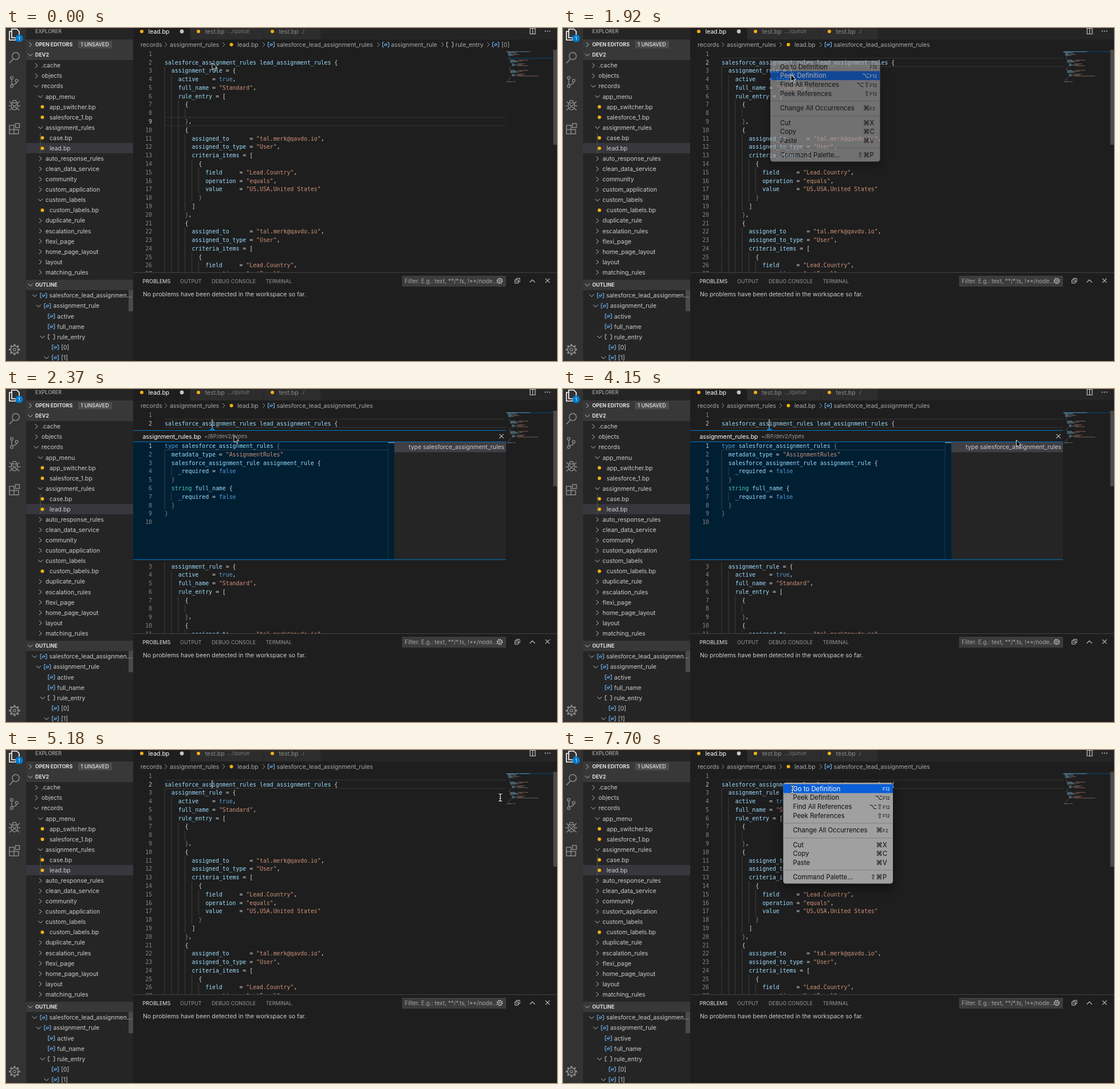
These frames come from a looping animation (962x582 px, 8000 ms). An HTML page:

```html
<!DOCTYPE html>
<html lang="en">
<head>
<meta charset="utf-8">
<title>Peek definition</title>
<style>
html, body { margin: 0; width: 100%; height: 100%; overflow: hidden; background: #1e1e1e; }
svg { display: block; width: 962px; height: 582px; }
text { white-space: pre; font-family: Inter, Roboto, sans-serif; }
.mono { font-family: 'DejaVu Sans Mono', 'Liberation Mono', monospace; }
.menu { filter: drop-shadow(0 7px 9px rgba(0,0,0,.5)); }
</style>
</head>
<body>
<svg id="stage" viewBox="0 0 962 582"></svg>
<script>
const LOOP = 8000, STEP = LOOP / 54;
const CH = 5.936, LINE = 14.79, LEFT = 277, PEEK_SHIFT = 235.2;

const MAIL = '"tal.merk@qavdo.io"';
const entry = (op, value) => `    {
        assigned_to      = ${MAIL},
        assigned_to_type = "User",
        criteria_items = [
          {
            field     = "Lead.Country",
            operation = "${op}",
            value     = "${value}"
          }
        ]
      },`;
const CODE = `
salesforce_assignment_rules lead_assignment_rules {
  assignment_rule = {
    active    = true,
    full_name = "Standard",
    rule_entry = [
      {
        
      },
  ${entry('equals', 'US,USA,United States')}
  ${entry('notEqual', 'US,USA,United States,America,Canada,Mexico')}
    ]
  }
  full_name = "Lead"
}`.split('\n');
const PEEK = `type salesforce_assignment_rules {
  metadata_type = "AssignmentRules"
  salesforce_assignment_rule assignment_rule {
    _required = false
  }
  string full_name {
    _required = false
  }
}
`.split('\n');

// drawing helpers, each returning markup
const text = (x, y, s, fill = '#cccccc', size = 10.45, more = '') =>
  `<text x="${x}" y="${y + size * .36}" fill="${fill}" font-size="${size}" ${more}>${s}</text>`;
const rect = (x, y, w, h, fill, more = '') =>
  `<rect x="${x}" y="${y}" width="${w}" height="${h}" fill="${fill}" ${more}/>`;
const path = (d, stroke, width = 1, more = '') =>
  `<path d="${d}" fill="none" stroke="${stroke}" stroke-width="${width}" ${more}/>`;
const disc = (x, y, r, fill) => `<circle cx="${x}" cy="${y}" r="${r}" fill="${fill}"/>`;
const ring = (x, y, r, stroke, width = 1, more = '') =>
  `<circle cx="${x}" cy="${y}" r="${r}" fill="none" stroke="${stroke}" stroke-width="${width}" ${more}/>`;
const right = (x, y, c = '#c5c5c5') => path(`M${x - 2} ${y - 4}l4 4-4 4`, c);
const down = (x, y, c = '#c5c5c5') => path(`M${x - 4} ${y - 2}l4 4 4-4`, c);
const cross = (x, y) => path(`M${x - 3.7} ${y - 3.7}l7.4 7.4m0-7.4l-7.4 7.4`, '#c5c5c5', 1.1);
const brackets = (x, y, c) => path(`M${x - 3} ${y - 4}h-2.5v8h2.5M${x + 3} ${y - 4}h2.5v8h-2.5`, c);
const varIcon = (x, y) => brackets(x, y, '#75beff') +
  path(`M${x - 2.5} ${y}l2-2 3 1v1.5l-2.5 1.6-2.5-1zM${x - 2.5} ${y}l2.5.8 2.5-1.8`, '#75beff', .8);
const fileIcon = (x, y) => disc(x - .5, y, 3, '#f5b011');

const tokenColor = (m, line) =>
  m[0] == '"' ? '#ce9178' :
  /^(true|false|type)$/.test(m) ? '#569cd6' :
  m == 'string' ? '#4ec9b0' :
  /\w/.test(m) ? '#9cdcfe' :
  m == '}' || (m == '{' && line.startsWith('type')) ? '#808080' : '#d4d4d4';
const TOKEN = /"[^"]*"|\w+|[^\s\w"]/g;

function codeLine(line, n, y, active) {
  const indent = line.search(/\S|$/);
  let out = text(255, y, n, active ? '#c6c6c6' : '#858585', 9.86, 'class="mono" text-anchor="end"');
  for (let c = 0; c < indent; c += 2)
    out += rect(LEFT + c * CH - .5, y - LINE / 2, 1, LINE, '#404040');
  const spans = line.replace(TOKEN, m => `<tspan fill="${tokenColor(m, line)}">${m}</tspan>`);
  return out + text(LEFT, y, spans, '#d4d4d4', 9.86, 'class="mono"');
}

// each row: depth, then > closed, v open, * file or blank
const TREE = ('0>.cache|0>objects|0vrecords|1vapp_menu|2*app_switcher.bp|2*salesforce_1.bp|1vassignment_rules|' +
  '2*case.bp|2*lead.bp|1>auto_response_rules|1>clean_data_service|1>community|1>custom_application|' +
  '1vcustom_labels|2*custom_labels.bp|1>duplicate_rule|1>escalation_rules|1>flexi_page|' +
  '1>home_page_layout|1>layout|1>matching_rules').split('|');
const OUTLINE = ('0vsalesforce_lead_assignmen...|1vassignment_rule|2 active|2 full_name|2vrule_entry|3 [0]|3v[1]').split('|');

function activityBar() {
  const g = '#8a8a8a';
  let gear = ring(14.8, 562, 6.6, g, 1.5) + ring(14.8, 562, 2.4, g, 1.4);
  for (let i = 0; i < 8; i++)
    gear += rect(13.2, 552.2, 3.2, 4, g, `transform="rotate(${i * 45} 14.8 562)"`);
  const node = (x, y) => ring(x, y, 2.4, g, 1.4);
  return rect(0, 0, 35, 582, '#333333') +
    path('M10 2h9l4 4v11H10zM10 6H6v15h11v-4', '#ffffff', 1.6) +
    disc(23, 18, 6.6, '#007acc') + text(23, 18, 1, '#fff', 8, 'text-anchor="middle"') +
    path('M12.5 54.5L6 61.5', g, 1.8) + ring(17, 49, 6.2, g, 1.5) +
    node(10, 87) + node(10, 101.5) + node(18.6, 92) + path('M10 89.5v9.5M18.5 94.5q0 4-8.5 4.5', g, 1.4) +
    path('M9.5 131H20v6q0 6-5.2 6t-5.3-6zM11 131q0-4.5 3.8-4.5t3.8 4.5M9.5 132l-3.5-4M20 132l3.5-4' +
      'M9.5 136h-5M20 136h5M10 140l-4 4M19.5 140l4 4M10.5 133l8.5 8M19 133l-8.5 8', g, 1.3) +
    path('M6 170h8v15H6zM6 177.5h16v7.5H6zM16.5 167h7v7h-7z', g, 1.5) + gear;
}

function sidebar() {
  const head = (y, s, chevron) => rect(35, y - 9, 187, 18, '#383839') + chevron(42.5, y) +
    text(51, y, s, '#e0e0e0', 8.9, 'font-weight="700"');
  let out = rect(35, 0, 187, 582, '#252526') + text(51, 6, 'EXPLORER', '#bbbbbb', 9) +
    head(29, 'OPEN EDITORS', right) + rect(126, 22.5, 59, 13, '#4d4d4d') + text(130.5, 29, '1 UNSAVED', '#fff', 9) +
    head(47, 'DEV2', down) + rect(35, 201, 187, 18, '#37373d') + rect(59.5, 183, 1, 36, '#585858');
  TREE.forEach((row, i) => {
    const x = 62 + 7 * row[0], y = 65.5 + 18.08 * i;
    out += { '>': right, v: down, '*': fileIcon }[row[1]](x - (row[1] == '*' ? 12 : 9), y) + text(x, y, row.slice(2));
  });
  out += rect(35, 440, 187, 1, '#404041') + head(449, 'OUTLINE', down) + rect(214, 458, 8, 37, '#4a4a4b');
  OUTLINE.forEach((row, i) => {
    const x = 75.5 + 6.9 * row[0], y = 467.6 + 18.08 * i;
    out += (row[1] == 'v' ? down(x - 25.5, y) : '') +
      (i == 4 ? brackets(x - 10, y, '#c5c5c5') : varIcon(x - 10, y)) + text(x, y, row.slice(2));
  });
  return out;
}

const TABS = rect(222, 0, 740, 20, '#252526') + rect(222, 0, 99, 20, '#1e1e1e') +
  rect(322, 0, 127.5, 20, '#2d2d2d') + rect(450.5, 0, 98.5, 20, '#2d2d2d') +
  [[237, '#ffffff', 'lead.bp', ''], [336, '#8c8c8c', 'test.bp', '.../queue'], [465, '#8c8c8c', 'test.bp', './']].map(([x, c, s, sub]) =>
    fileIcon(x + .5, 6) + text(x + 11.5, 6, s, c) + text(x + 50, 6, sub, '#757575', 9.4)).join('') +
  disc(307, 6, 3.4, '#c5c5c5') + path('M915 .5h9v10h-9zM919.5 0v10', '#c5c5c5', 1.2) +
  [941.5, 945.5, 949.5].map(x => disc(x, 5.5, 1, '#c5c5c5')).join('');

function breadcrumb(full) {
  const y = 29, c = '#a9a9a9', t = (x, s) => text(x, y, s, c);
  const sep = xs => xs.map(x => right(x, y, '#909090')).join('');
  return t(235, 'records') + sep([279, 380, 450]) + t(286, 'assignment_rules') + fileIcon(394, y) + t(404, 'lead.bp') +
    varIcon(463, y) + t(472.5, 'salesforce_lead_assignment_rules') +
    (full ? sep([650, 762, 842]) + varIcon(663, y) + t(672, 'assignment_rule') + brackets(775, y, '#c5c5c5') +
      t(784.5, 'rule_entry') + varIcon(855, y) + t(865, '[0]') : '');
}

function minimap(active) {
  let out = rect(873, 39 + (active - 1) * 1.64, 83, 1.6, '#0d3a58');
  CODE.forEach((line, i) => {
    for (const m of line.matchAll(TOKEN))
      out += rect(873.5 + m.index * .82, 39.2 + i * 1.64, m[0].length * .82, 1, tokenColor(m[0], line), 'opacity=".55"');
  });
  return out;
}

function editor(active, peek) {
  const y = n => 45.2 + LINE * (n - 1) + (peek && n > 2 ? PEEK_SHIFT : 0);
  let out = path(`M${LEFT} ${y(active) - 7.4}H873M${LEFT} ${y(active) + 7.4}H873`, '#303030', 1.2);
  CODE.forEach((line, i) => { if (y(i + 1) < 435) out += codeLine(line, i + 1, y(i + 1), i + 1 == active); });
  return out + minimap(active) + rect(955.5, 38, 6.5, peek ? 132 : 166, '#4b4b4b');
}

function peekView() {
  return `<path d="M354 73l6-6 6 6z" fill="#007acc"/>` + rect(222, 72.5, 651, 226, '#1e1e1e') +
    rect(222, 92, 456, 206, '#001f33') + rect(678, 92, 195, 206, '#252526') + rect(678, 93, 195, 17.5, '#3f3f46') +
    path(`M${LEFT} 106.5H667`, '#2d3b45') + rect(666.5, 92, 1, 206, '#17384c') + rect(667.5, 93, 10.5, 1.5, '#7d8a94') +
    PEEK.map((line, i) => codeLine(line, i + 1, 99.5 + LINE * i, !i)).join('') +
    text(238.5, 83, 'assignment_rules.bp', '#ffffff') + text(346, 83, '~/BP/dev2/types', '#999999', 9.4) + cross(865, 82.5) +
    text(870, 101.5, 'type salesforce_assignment_rules', '#cccccc', 10.45, 'text-anchor="end"') +
    path('M222 72.5H873M222 92.3H873M222 298.2H873', '#007acc');
}

function panel() {
  const tab = (x, s, c = '#969696') => text(x, 442.5, s, c, 9);
  return rect(222, 427, 740, 155, '#1e1e1e') + rect(222, 427, 740, 1, '#414141') +
    tab(238.5, 'PROBLEMS', '#e7e7e7') + tab(304, 'OUTPUT') + tab(359, 'DEBUG CONSOLE') + tab(453.5, 'TERMINAL') +
    rect(691.5, 433, 181.5, 19, '#3c3c3c') +
    text(696, 442.5, 'Filter. E.g.: text, **/*.ts, !**/node...', '#a6a6a6', 10) +
    ring(862, 442, 4.6, '#c5c5c5', 1.6, 'stroke-dasharray="1.8 1.8"') + ring(862, 442, 3.6, '#c5c5c5', .9) + ring(862, 442, 1.3, '#c5c5c5', .8) +
    path('M888.5 440h6v6h-6zM891 440v-2.5h6v6h-2.5M890 443h3', '#c5c5c5') +
    path('M914.5 444.5l4.5-4.5 4.5 4.5', '#c5c5c5', 1.2) + cross(945.5, 441.5) +
    text(239, 465, 'No problems have been detected in the workspace so far.');
}

const MENU = [[67.5, 'Go to Definition', '', 'F12'], [83.3, 'Peek Definition', '⌥', 'F12'],
  [99, 'Find All References', '⌥⇧', 'F12'], [114.5, 'Peek References', '⇧', 'F12'],
  [140, 'Change All Occurrences', '⌘', 'F2'], [165.5, 'Cut', '⌘', 'X'], [181, 'Copy', '⌘', 'C'],
  [197, 'Paste', '⌘', 'V'], [222, 'Command Palette...', '⇧⌘', 'P']];

function menu(x, picked, dim, alpha) {
  let out = rect(x, 57, 191.5, 176.5, '#a0a0a0', 'rx="4.5"') +
    [127, 153, 209].map(y => rect(x, y, 191.5, 1.5, '#8b8b8b')).join('');
  MENU.forEach(([y, label, mods, key], i) => {
    const on = i == picked, c = !on ? '#0c0c0c' : dim ? '#0c4596' : '#ffffff';
    if (on) out += rect(x, y - 7.8, 191.5, 15.6, '#0a5fd9');
    out += text(x + 17, y, label, c, 11.3) +
      text(x + 173.5, y, mods, c, 11.5, `text-anchor="end" style="font-family:'DejaVu Sans',sans-serif"`) +
      text(x + 173.5, y + (key[1] ? .8 : 0), key, c, key[1] ? 8 : 11.3);
  });
  return `<g class="menu" opacity="${alpha}">${out}</g>`;
}

// pointer stops: step, x, y
const STOPS = [[0, 360, 61], [7, 360, 61], [8, 380, 69.5], [10, 398, 81.5], [21, 398, 81.5], [22, 440, 105],
  [23, 540, 129], [24, 656, 109], [25, 656, 109], [28, 791.5, 89], [31, 857, 82], [33, 863, 78], [34, 863, 83], [36, 863, 83],
  [37, 835, 92], [39, 620, 111], [41, 430, 75], [42, 382.5, 60], [50, 382.5, 60], [52, 400.5, 69], [54, 400.5, 69]];
function pointer(k) {
  const i = STOPS.findIndex(s => s[0] > k), [a, ax, ay] = STOPS[i - 1], [b, bx, by] = STOPS[i];
  const f = (k - a) / (b - a), at = `transform="translate(${ax + (bx - ax) * f} ${ay + (by - ay) * f})"`;
  if (k < 35) return `<path ${at} d="M0 0V12l2.8-2.6 2.2 4.6 1.9-.9-2.1-4.4h3.8z" fill="#000" stroke="#fff" stroke-width=".9"/>`;
  const beam = 'M-3-6.5q3 0 3 2v9q0 2-3 2M3-6.5q-3 0-3 2M3 6.5q-3 0-3-2M-1.5 1.5h3';
  return path(beam, '#000', 2.4, at) + path(beam, '#fff', 1.2, at);
}

// caret toggles on, off, on, ... at these steps
const BLINKS = [1, 4, 8, 11, 14, 18, 21, 24, 27, 31, 34, 37, 41, 44, 47, 51];
const caret = k => BLINKS.filter(b => b <= k).length % 2 ?
  rect(k < 47 ? 359.2 : 383, 53, 1.6, 14, '#aeafad') : '';

const FRAME = activityBar() + sidebar() + TABS, PANEL = panel();
function scene(k) {
  const peek = k >= 16 && k < 34;
  const popup = k >= 2 && k < 14 ? menu(362, k < 8 ? -1 : k < 10 ? 0 : 1, k == 8, k == 13 ? .64 : 1) :
    k >= 48 ? menu(384.5, k < 51 ? -1 : 0, k == 51, 1) : '';
  return rect(0, 0, 962, 582, '#1e1e1e') + editor(k ? 2 : 9, peek) + (peek ? peekView() : '') + caret(k) +
    breadcrumb(!k) + FRAME + PANEL + popup + pointer(k);
}

const stage = document.getElementById('stage');
let shown = -1;
function tick(now) {
  const k = Math.min(53, Math.floor((now % LOOP + 11) / STEP));
  if (k != shown) stage.innerHTML = scene(shown = k);
  requestAnimationFrame(tick);
}
tick(performance.now());
</script>
</body>
</html>
```
